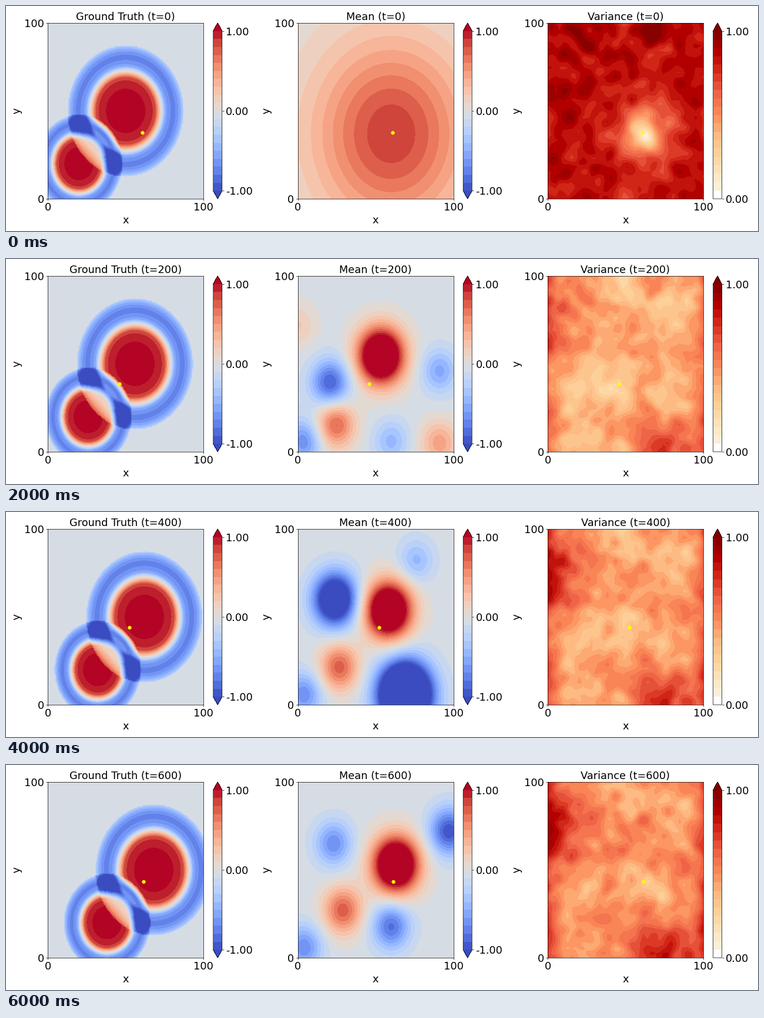
A matplotlib script that plays this animation: 1280 by 384 pixels, repeating every 6500 ms.

```python
import numpy as np
import matplotlib.pyplot as plt
from matplotlib.animation import FuncAnimation

W, H, DPI = 1280, 384, 64
FRAMES, INTERVAL, STEP = 13, 500, 50
FONT, BANDS = 20, 20

plt.rcParams["font.family"] = "DejaVu Sans"
rng = np.random.default_rng(7)


def mesh(n):
    return np.meshgrid(np.linspace(0, 100, n), np.linspace(0, 100, n))


FINE, COARSE = mesh(121), mesh(40)


def bump(grid, x, y, size, height):
    dx, dy = grid[0] - x, (grid[1] - y) / 1.08
    return height * np.exp(-0.5 * (dx ** 2 + dy ** 2) / size ** 2)


def hill(x, y, height):
    """Feature of the mean field; stronger ones are wider."""
    return bump(FINE, x, y, 7.4 + 1.6 * abs(height), height)


def track(t, keys, start=100):
    """Linear motion through keys spread evenly from start to t=600."""
    times = np.linspace(start, 600, len(keys))
    return [np.interp(t, times, column) for column in zip(*keys)]


# Sensor path (x, y) and the drifting cold spots (x, y, height) of the mean.
SENSOR = [(60.8, 37.7), (55.4, 48), (45.8, 38.8), (40.3, 38),
          (52.4, 44), (58.8, 47), (61.4, 43.3)]
COLD_LEFT = [(18, 40, -0.95), (21, 39, -0.9), (29.5, 41, -1.4),
             (24, 60, -1.6), (19, 62, -1.9), (23, 65, -0.65)]
COLD_BOTTOM = [(49, 8, -1), (60, 6, -0.4), (68, 14, -0.65),
               (69, 6, -2.7), (86, 3, -5), (60, 18, -0.8)]
COLD_RIGHT = [(93, 43, -0.55), (91, 46, -0.5), (68, 89, -0.2),
              (76, 82, -0.4), (89, 75, -0.7), (97, 72, -0.95)]


# Radial profile of a ripple, against radius / outer radius.
RADII = (0, .35, .5, .61, .68, .82, .93, 1, 1.005)
LEVELS = (1.1, 1, .87, 0, -.55, -.78, -.55, -.27, 0)


def ground_truth(t):
    gx, gy = FINE[0] - 0.03 * t, FINE[1]
    big_dist = np.hypot(gx - 50, gy - 50) / 37.4
    small_dist = np.hypot(gx - 20, gy - 20) / 27.9
    big = np.interp(big_dist, RADII, LEVELS)
    small = np.interp(small_dist, RADII, LEVELS)
    # The small ripple suppresses the crest of the big one, not its trough.
    outside = np.clip((small_dist - 0.86) / 0.14, 0, 1)
    return np.where(big > 0, big * outside, big) + small - 0.005


def mean(t):
    prior = bump(FINE, 60, 37, 35, 0.88)
    move = np.clip((t - 100) / 500, 0, 1)
    early = np.clip((300 - t) / 100, 0, 1)
    field = -0.04 + hill(51 + 12 * move, 55 - 2 * move, 1.85)
    field += hill(23 + 6 * move, 13 + 14 * move, 0.8)
    for keys in (COLD_LEFT, COLD_BOTTOM, COLD_RIGHT):
        field += hill(*track(t, keys))
    field += hill(4, 6, -0.65 * np.clip((t - 100) / 100, 0, 1))
    field += early * (hill(91, 5, 0.5) + hill(0, 72, 0.25))
    field += np.clip((200 - t) / 100, 0, 1) * hill(41, 93, -0.4)
    learned = min(t / 100, 1)
    return (1 - learned) * prior + learned * field


def blur(a):
    for axis in (0, 1):
        a = (np.roll(a, 1, axis) + 2 * a + np.roll(a, -1, axis)) / 4
    return a


def noise():
    fine, wide = rng.normal(size=(2,) + COARSE[0].shape)
    fine, wide = blur(fine), blur(blur(blur(wide)))
    return 0.7 * fine / fine.std() + 0.7 * wide / wide.std()


NOISE_A, NOISE_B = noise(), noise()


def variance(t):
    gx, gy = COARSE
    x, y = track(t, SENSOR, start=0)
    learned = min(t / 100, 1) ** 0.4  # uncertainty drops fast at first
    edges = 0.17 * (np.exp(-gx / 4) + np.exp((gx - 100) / 4))
    known = 0.41 + 0.0002 * t + edges
    known += bump(COARSE, 74, 1, 15, 0.27)
    known += bump(COARSE, 3, 74, 13, 0.27 * np.clip((t - 100) / 200, 0, 1))
    for spot in [(80, 27), (82, 79), (25, 3), (50, 95), (16, 40)]:
        known += bump(COARSE, *spot, 8.5, -0.15)
    known += bump(COARSE, x, y, 11, -0.2)
    prior = 0.86 + bump(COARSE, x, y, 6, -0.52) + bump(COARSE, x, y, 15, -0.28)
    turn = t / 600 * np.pi / 2
    grain = np.cos(turn) * NOISE_A + np.sin(turn) * NOISE_B
    field = (1 - learned) * prior + learned * known + 0.05 * grain
    return np.clip(field, 0.02, 0.98)


def band_colors(name):
    return list(plt.get_cmap(name)((np.arange(BANDS) + 0.5) / BANDS))


warm, heat = plt.get_cmap("coolwarm"), plt.get_cmap("OrRd")
signed = dict(levels=np.linspace(-1, 1, BANDS + 1), extend="both",
              colors=[warm(0.0)] + band_colors("coolwarm") + [warm(1.0)])
positive = dict(levels=np.linspace(0, 1, BANDS + 1), extend="max",
                colors=["white"] + band_colors("OrRd")[1:] + [heat(1.0)])

PANELS = [("Ground Truth", ground_truth, FINE, signed, [-1, 0, 1]),
          ("Mean", mean, FINE, signed, [-1, 0, 1]),
          ("Variance", variance, COARSE, positive, [0, 1])]

fig = plt.figure(figsize=(W / DPI, H / DPI), dpi=DPI, facecolor="white")
axes, fills, markers = [], [], []
for k, (name, field, grid, style, ticks) in enumerate(PANELS):
    ax = fig.add_axes([(71.2 + 425.4 * k) / W, 55 / H, 331.25 / W, 300 / H])
    fill = ax.contourf(*grid, field(0), **style)
    bar = fig.colorbar(fill, ax=ax, ticks=ticks, format="%.2f")
    bar.ax.tick_params(labelsize=FONT)
    ax.set(xlim=(0, 100), ylim=(0, 100), xticks=[0, 100], yticks=[0, 100])
    ax.tick_params(labelsize=FONT)
    ax.set_xlabel("x", fontsize=FONT)
    ax.set_ylabel("y", fontsize=FONT)
    markers += ax.plot([], [], "o", color="yellow", ms=6, zorder=3)
    axes.append(ax)
    fills.append(fill)


def update(i):
    t = STEP * i
    x, y = track(t, SENSOR, start=0)
    for k, (name, field, grid, style, _) in enumerate(PANELS):
        fills[k].remove()
        fills[k] = axes[k].contourf(*grid, field(t), **style)
        markers[k].set_data([x], [y])
        axes[k].set_title(f"{name} (t={t})", fontsize=FONT)
    return fills + markers


anim = FuncAnimation(fig, update, frames=FRAMES, interval=INTERVAL,
                     repeat=True, repeat_delay=0, blit=False)
plt.show()
```
